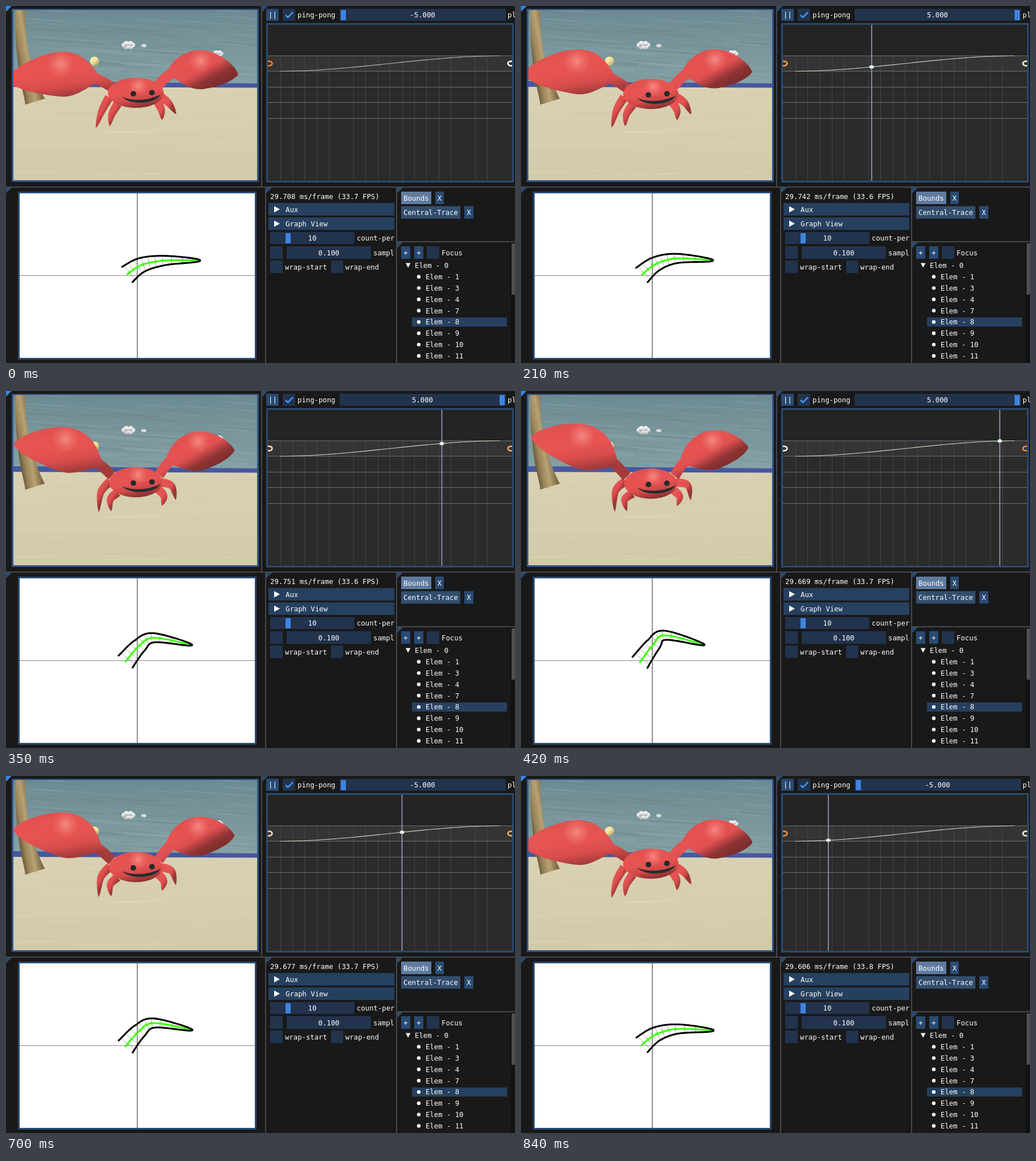
Recreate the animation shown at these times as an HTML page with a canvas. Size 894 by 627 pixels, loop 910 ms.

```html
<!DOCTYPE html>
<html lang="en">
<head>
<meta charset="utf-8">
<title>Crab rig editor</title>
<style>
html, body { margin: 0; width: 100%; height: 100%; overflow: hidden; background: #191919; }
canvas { display: block; }
</style>
</head>
<body>
<canvas id="stage" width="894" height="627"></canvas>
<script>
const ctx = document.getElementById('stage').getContext('2d');
const STEP = 70, LOOP = 910;
const FIELD = '#22334d', HEADER = '#26405f', BUTTON = '#294b73', GRAB = '#3d85e0';
const CURVE = { left: 482, right: 867, top: 87.5, bottom: 114.5 };
const readings = [29.708, 29.742, 29.751, 29.669, 29.677, 29.677, 29.606]; // ms per frame

const mix = (a, b, p) => a + (b - a) * p;
const clamp = (v, lo = 0, hi = 1) => Math.max(lo, Math.min(hi, v));
const phase = t => ((t - 26) / LOOP + 1) % 1;

// Ping-pong sweep that overshoots the curve at both ends.
function playhead(t) {
  const f = phase(t), sweep = 1 - Math.abs(2 * f - 1);
  return 441 + 462 * sweep - 15 * Math.sin(2 * Math.PI * f) ** 5;
}

function ease(x) {
  const u = clamp((x - CURVE.left) / (CURVE.right - CURVE.left));
  return u * u * (3 - 2 * u);
}

const curveY = x => mix(CURVE.bottom, CURVE.top, ease(x));
const bendAt = t => ease(playhead(t - 30)); // the rig trails the playhead

function pose(from, to, p) {
  return from.map(([x, y], i) => [mix(x, to[i][0], p), mix(y, to[i][1], p)]);
}

// Catmull-Rom position along a few key points.
function along(points, u) {
  const last = points.length - 1, s = clamp(u) * last;
  const i = Math.min(Math.floor(s), last - 1), f = s - i;
  const at = k => points[clamp(k, 0, last)];
  return [0, 1].map(k => {
    const a = at(i - 1)[k], b = at(i)[k], c = at(i + 1)[k], d = at(i + 2)[k];
    return b + f * (c - a) / 2 + f * f * (a - 2.5 * b + 2 * c - d / 2) + f ** 3 * (1.5 * (b - c) + (d - a) / 2);
  });
}

// Point at a signed distance from the spine.
function beside(spine, u, offset) {
  const [x, y] = along(spine, u), a = along(spine, clamp(u - 0.01)), b = along(spine, clamp(u + 0.01));
  const dx = b[0] - a[0], dy = b[1] - a[1], d = Math.hypot(dx, dy);
  return [x + dy / d * offset, y - dx / d * offset];
}

function edge(spine, width, side) {
  return Array.from({ length: 61 }, (_, i) => beside(spine, i / 60, side * width(i / 60)));
}

function path(points) {
  ctx.beginPath();
  points.forEach(point => ctx.lineTo(...point));
}

function fillPath(points, color) {
  path(points);
  ctx.fillStyle = color;
  ctx.fill();
}

function strokePath(points, color, width = 1) {
  path(points);
  ctx.strokeStyle = color;
  ctx.lineWidth = width;
  ctx.stroke();
}

const line = (x, y, x2, y2, color, width) => strokePath([[x, y], [x2, y2]], color, width);

function limb(spine, width, color) {
  fillPath([...edge(spine, width, 1), ...edge(spine, width, -1).reverse()], color);
}

function rect(x, y, x2, y2, color) {
  ctx.fillStyle = color;
  ctx.fillRect(x, y, x2 - x, y2 - y);
}

function ellipse(x, y, rx, ry, color) {
  ctx.fillStyle = color;
  ctx.beginPath();
  ctx.ellipse(x, y, rx, ry, 0, 0, Math.PI * 2);
  ctx.fill();
}

function text(value, x, y, align = 'left') {
  ctx.fillStyle = '#fff';
  ctx.textAlign = align;
  ctx.fillText(value, x, y);
}

function clipped(x, y, x2, y2, draw) {
  ctx.save();
  ctx.beginPath();
  ctx.rect(x, y, x2 - x, y2 - y);
  ctx.clip();
  draw();
  ctx.restore();
}

function ramp(x, y, x2, y2, ...colors) {
  const g = ctx.createLinearGradient(x, y, x2, y2);
  colors.forEach((c, i) => g.addColorStop(i / (colors.length - 1), c));
  return g;
}

function glow(x, y, r) {
  const g = ctx.createRadialGradient(x, y, 0, x, y, r);
  g.addColorStop(0, 'rgba(255,190,182,.5)');
  g.addColorStop(1, 'rgba(255,150,140,0)');
  ellipse(x, y, r, r, g);
}

function random(seed) {
  return () => (seed = seed * 16807 % 2147483647) / 2147483647;
}

function streaks(rnd, count, top, bottom, slope, light, dark) {
  for (let i = 0; i < count; i++) {
    const x = -40 + rnd() * 440, y = mix(top, bottom, rnd()), w = 60 + rnd() * 150;
    line(x, y, x + w, y + w * slope, rnd() < 0.5 ? light : dark, 1 + rnd() * 2.5);
  }
}

function cloud(x, y, size) {
  for (let i = 0; i < 6; i++) {
    const a = i * Math.PI / 3, r = size * 0.45;
    const cx = x + Math.cos(a) * size * 0.75, cy = y + Math.sin(a) * size * 0.35;
    ellipse(cx, cy, r, r, ramp(cx, cy - r, cx, cy + r, '#fff', '#e6e6e6', '#9fa5a5'));
  }
}

function beach() {
  const rnd = random(41);
  rect(13, 7, 441, 145, ramp(0, 7, 0, 140, '#6c8a91', '#78969b', '#84a1a4'));
  streaks(rnd, 70, 0, 132, 0.07, 'rgba(180,205,205,.1)', 'rgba(65,95,103,.09)');
  fillPath([[13, 132], [441, 136], [441, 146], [13, 144]], '#4658a0');
  fillPath([[13, 142], [441, 143.5], [441, 306], [13, 306]], ramp(0, 142, 0, 306, '#d9d1b3', '#d3caaa'));
  streaks(rnd, 40, 152, 306, -0.02, 'rgba(232,225,200,.15)', 'rgba(180,168,130,.07)');
  limb([[25, 0], [27, 60], [36, 118], [51, 168]], u => 8.5 + 9.5 * u * u,
    ramp(15, 90, 60, 82, '#57482d', '#9a8358', '#b8a173', '#857049', '#5c4c30'));
  cloud(215, 69, 10);
  cloud(242, 70, 4);
  cloud(372, 84, 8);
  cloud(142, 103, 4);
  ellipse(155.5, 97, 8, 8, ramp(150, 90, 161, 104, '#fff3b5', '#efdf98', '#ad9c68'));
}

// Spines run shoulder, wrist, middle, tip for claws and hip, knee, foot for legs.
const rig = {
  leftClaw: [[[186, 142], [151, 126], [92, 120], [-1, 130]], [[186, 151], [157, 122], [104, 95], [18, 78]]],
  rightClaw: [[[266, 140], [296, 116], [347, 112], [408, 120]], [[270, 150], [292, 121], [341, 102], [399, 98]]],
  legs: [
    [[[181, 160], [168, 185], [158, 214]], [[184, 158], [166, 175], [165, 212]]],
    [[[196, 172], [186, 190], [182, 211]], [[195, 181], [182, 191], [186, 211]]],
    [[[270, 158], [286, 171], [299, 190]], [[270, 161], [293, 165], [298, 192]]],
    [[[266, 168], [273, 183], [274, 200]], [[269, 175], [279, 186], [274, 202]]]
  ]
};

const legWidth = u => 7.5 * (1 - u ** 2.5);
const clawWidth = bulge => u =>
  9 * (1 - u ** 6) + bulge * Math.sin(Math.PI * clamp((u - 0.28) / 0.72));

function claw([from, to], p, bulge, lean, ...colors) {
  const spine = pose(from, to, p), [x, y] = spine[2], r = bulge + 9;
  limb(spine, clawWidth(bulge), ramp(x - lean, y - r, x + lean, y + r, ...colors));
  glow(x + 8 - lean * 0.7, y - r * 0.45, r * 0.6);
}

function crab(p) {
  const dy = 10.8 * p, cy = 152.5 + dy;
  for (const [from, to] of rig.legs) {
    const spine = pose(from, to, p), [x, y] = spine[1];
    limb(spine, legWidth, ramp(x - 7, y - 5, x + 8, y + 4, '#e65553', '#dd4f4d', '#9a3636'));
  }
  const lit = '#e65452', base = '#e05050';
  claw(rig.leftClaw, p, 31, 6, base, lit, lit, '#d94d4c', '#a43b3b');
  claw(rig.rightClaw, p, 26, 19, base, lit, base, '#8d3333', '#7a2b2b');
  ellipse(228, cy, 49 - 2.5 * p, 26.5, ramp(220, cy - 27, 230, cy + 27, base, lit, lit, '#cd4847', '#873030'));
  glow(232, cy - 13, 17);

  ellipse(223.7, 154 + dy, 5, 4.8, '#24292a');
  ellipse(256.3, 152 + dy, 5, 4.8, '#24292a');
  ctx.beginPath();
  ctx.moveTo(204, 159.5 + dy);
  ctx.bezierCurveTo(222, 168 + dy, 252, 166 + dy, 271, 155.5 + dy);
  ctx.bezierCurveTo(266, 170 + dy, 222, 177 + dy, 204, 159.5 + dy);
  ctx.fillStyle = '#272c2d';
  ctx.fill();
}

function scene(p) {
  rect(10, 5, 444, 309, '#315488');
  clipped(13, 7, 441, 306, () => {
    beach();
    crab(p);
  });
}

function marker(x, heat) {
  ctx.strokeStyle = `rgb(255,${mix(255, 128, heat)},${mix(250, 24, heat)})`;
  ctx.lineWidth = 2.6;
  ctx.beginPath();
  ctx.ellipse(x, 101, 6, 4, 0, 0, Math.PI * 2);
  ctx.stroke();
}

function timeline(p, x, forward) {
  rect(457, 5, 479, 26, BUTTON);
  text('||', 461, 20);
  rect(486, 5, 508, 26, FIELD);
  strokePath([[491, 16], [495, 20], [504, 11]], '#4296fa', 2.5);
  text('ping-pong', 512, 20);
  rect(586, 5, 878, 26, FIELD);
  const grab = forward ? 867 : 588;
  rect(grab, 7, grab + 9, 25, GRAB);
  text(forward ? '5.000' : '-5.000', 731.5, 20, 'center');
  text('pl', 881, 20);

  rect(457, 30, 892, 310, BUTTON);
  clipped(460, 33, 889, 307, () => {
    rect(460, 33, 889, 307, '#2b2b2b');
    rect(460, 33, 889, 87, '#242424');
    rect(460, 87, 889, 115, '#343434');
    for (let k = 0; k < 18; k++) {
      if (k % 10 === 5) continue;
      const gx = Math.floor(CURVE.left + k * 21.4) + 0.5;
      line(gx, 87, gx, 307, '#454545');
    }
    for (let k = 0; k < 5; k++) {
      const gy = Math.floor(87 + k * 27.5) + 0.5;
      line(460, gy, 889, gy, '#717171');
    }
    const visible = x > CURVE.left - 10 && x < CURVE.right + 10;
    const curve = [];
    for (let gx = CURVE.left; gx <= CURVE.right; gx += 5) curve.push([gx, curveY(gx)]);
    strokePath(curve, visible ? '#bfd9b9' : '#b5b5b5', 1.1);
    if (visible) {
      line(x, 33, x, 307, '#9092ac', 1.8);
      ellipse(x, curveY(x), 4, 3, '#e4f2e1');
    }
    marker(461.5, 1 - p);
    marker(887.5, p);
  });
}

function profile(p) {
  rect(21, 326, 440, 621, BUTTON);
  rect(24, 329, 437, 618, '#fff');
  line(24, 473.5, 437, 473.5, '#858585');
  line(230.5, 329, 230.5, 618, '#303030');
  const spine = pose([[212, 472], [238, 455], [280, 447], [342, 447]],
                     [[208, 478], [231, 446], [251, 428], [322, 446]], p);
  const width = u => 16.5 * (1 - u) ** 0.65;
  for (let i = 1; i < 11; i++) {
    const u = i / 11, w = width(u);
    strokePath([beside(spine, u, w), beside(spine, u, -w)], '#8d988a', 0.7);
    strokePath([beside(spine, u, 3.5), beside(spine, u, -3.5)], '#38f000', 1.3);
  }
  strokePath(edge(spine, () => 0, 1), '#3cff0a', 3);
  for (const side of [1, -1]) strokePath(edge(spine, width, side), '#000', 3.1);
}

function settings(ms) {
  text(`${ms.toFixed(3)} ms/frame (${(1000 / ms).toFixed(1)} FPS)`, 464, 339);
  ['Aux', 'Graph View'].forEach((label, i) => {
    const y = 346 + i * 25.2;
    rect(461, y, 682, y + 22, HEADER);
    fillPath([[471, y + 5.5], [481, y + 11], [471, y + 16.5]], '#fff');
    text(label, 491, y + 15.5);
  });
  rect(464, 397, 612, 418, FIELD);
  rect(491, 399, 500, 417, GRAB);
  text('10', 538, 412, 'center');
  text('count-per', 616, 412);
  rect(464, 422, 486, 444, FIELD);
  rect(493, 422, 641, 444, FIELD);
  text('0.100', 567, 437.5, 'center');
  text('sampl', 645, 437.5);
  rect(464, 447, 486, 469, FIELD);
  text('wrap-start', 490, 463);
  rect(571, 447, 592, 469, FIELD);
  text('wrap-end', 596, 463);
}

function button(label, x, y, x2, color = BUTTON) {
  rect(x, y, x2, y + 22, color);
  text(label, (x + x2) / 2, y + 15.5, 'center');
}

function outline() {
  button('Bounds', 694, 326, 747, '#607ba0');
  button('X', 754, 326, 769);
  button('Central-Trace', 694, 351.5, 798, '#324e6d');
  button('X', 805, 351.5, 821);
  button('+', 694, 422, 710);
  button('+', 717, 422, 733);
  rect(739, 422, 761, 444, FIELD);
  text('Focus', 765, 437.5);
  fillPath([[702, 451.5], [710.5, 451.5], [706.2, 459.5]], '#fff');
  text('Elem - 0', 718, 460);
  rect(713, 547, 880, 563, HEADER);
  [1, 3, 4, 7, 8, 9, 10, 11].forEach((id, i) => {
    const y = 480 + i * 19.85;
    ellipse(725, y - 4.5, 3.2, 3.2, '#fff');
    text(`Elem - ${id}`, 737, y);
  });
  rect(886, 415, 894, 627, '#121212');
  rect(888, 417, 894, 507, '#4f4f4f');
}

function panels() {
  const gap = '#47474d';
  rect(0, 0, 894, 627, '#191919');
  rect(448, 0, 450, 318, gap);
  rect(0, 317, 894, 319, gap);
  rect(455, 319, 457, 627, gap);
  rect(685, 319, 687, 627, gap);
  rect(687, 413, 894, 415, gap);
  [[0, 0], [450, 0], [0, 319], [457, 319], [687, 319], [687, 415]].forEach(([x, y], i) =>
    fillPath([[x, y], [x + 10, y], [x, y + 10]], i ? BUTTON : '#3186f5'));
}

function draw(t) {
  ctx.font = '12.25px "DejaVu Sans Mono", monospace';
  ctx.lineJoin = 'round';
  const p = bendAt(t);
  panels();
  scene(p);
  timeline(p, playhead(t), phase(t) < 0.5);
  profile(p);
  settings(readings[Math.floor(t / STEP / 2)]);
  outline();
}

let shown = -1;
function tick() {
  const t = Math.floor(performance.now() % LOOP / STEP) * STEP;
  if (t !== shown) draw(shown = t);
  requestAnimationFrame(tick);
}
tick();
</script>
</body>
</html>
```
